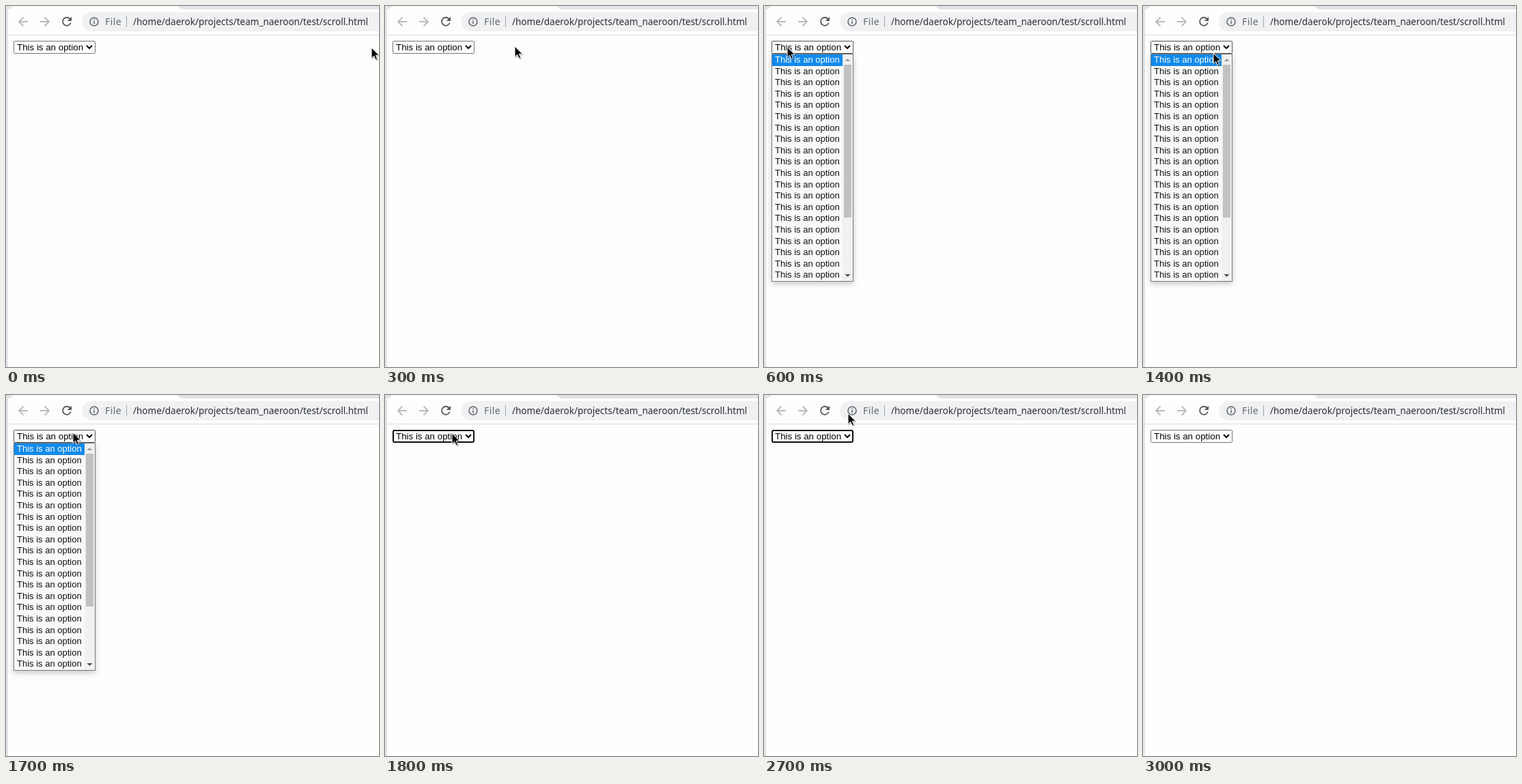
An HTML page that plays this animation: 546x529 px, repeating every 3.2 s.

```html
<!DOCTYPE html>
<html lang="en">
<head>
<meta charset="utf-8">
<title>Select menu</title>
<style>
  html, body { margin: 0; width: 100%; height: 100%; overflow: hidden; background: #fefefe; }
  svg { display: block; }
  .url { font: 13.5px "Noto Sans", "Open Sans", sans-serif; fill: #2b2e32; }
  .scheme { font-size: 14px; letter-spacing: .4px; fill: #65696d; }
  .option { font: 13px "Liberation Sans", Arial, sans-serif; fill: #111; }
  .value { font-size: 13.333px; fill: #000; }
  .line { fill: none; stroke-width: 1.8; }
  .popup { filter: drop-shadow(0 3px 4px rgba(0, 0, 0, .22)); }
</style>
</head>
<body>
<svg width="546" height="529" viewBox="0 0 546 529">
  <rect id="frame" width="546" height="529"/>
  <path d="M3 529V5Q8 5 10 0H252Q254 5 259 5H546V529Z" fill="#fefefe"/>
  <rect x="3" y="42" width="543" height="1" fill="#d9dbde"/>

  <g class="line" stroke="#b8babd">
    <path d="M32 23H19M25.5 16.5L19 23L25.5 29.5"/>
    <path d="M50 23H63M56.5 16.5L63 23L56.5 29.5"/>
  </g>
  <path class="line" d="M93.6 18.8A6 6 0 1 0 94.8 24.5" stroke="#54585c"/>
  <path d="M96 15.8V22H89.8Z" fill="#54585c"/>

  <path d="M560 9H125A14 14 0 0 0 125 37H560Z" fill="#f0f1f3"/>
  <circle cx="129" cy="23" r="6" fill="none" stroke="#5f6368" stroke-width="1.5"/>
  <path d="M129 19.2V20.8M129 22V26.6" stroke="#5f6368" stroke-width="1.5"/>
  <text class="url scheme" x="145" y="28">File</text>
  <rect x="176" y="15" width="1" height="16" fill="#a4a7aa"/>
  <text class="url" x="186" y="28">/home/daerok/projects/team_naeroon/test/scroll.html</text>

  <rect id="box" fill="#fff"/>
  <text class="option value" x="16" y="65">This is an option</text>
  <path d="M118 58L122 62L126 58" class="line" stroke="#000" style="stroke-width:2"/>

  <g id="popup">
    <rect class="popup" x="11.5" y="70.5" width="119" height="333" fill="#f9f9fa" stroke="#77797c"/>
    <rect x="12" y="71" width="103" height="17" fill="#118aee"/>
    <g id="options"></g>
    <rect x="115" y="71" width="15" height="332" fill="#f1f1f1"/>
    <rect x="117" y="86" width="11" height="224" fill="#c1c1c1"/>
    <path d="M118.5 81L122.5 77L126.5 81Z" fill="#a3a3a3"/>
    <path d="M118.5 393L122.5 397L126.5 393Z" fill="#505050"/>
  </g>

  <path id="cursor" d="M0 0V15.5L3.6 12.2L6 17.8L8.6 16.7L6.2 11.3H11Z" fill="#000"
    stroke="#fff" stroke-width="1" stroke-linejoin="round"
    style="filter:drop-shadow(1px 1px .7px rgba(0,0,0,.35))"/>
</svg>
<script>
const LOOP = 3200, OPEN = 600, CLOSE = 1800, LEAVE = 2900, BLUR = 3000;
// Pointer steps: time, x, y
const path = [
  [0, 535, 61], [100, 478, 61], [200, 345, 60], [300, 190, 59], [400, 75, 58],
  [500, 30, 59], [600, 34, 60], [1400, 103, 69], [1600, 100, 60], [1700, 98, 55],
  [1800, 98, 56], [2100, 133, 58], [2300, 180, 78], [2500, 192, 111],
  [2600, 160, 72], [2700, 123, 27], [2800, 119, 11]
];
const get = id => document.getElementById(id);
const set = (node, attrs) => {
  for (const name in attrs) node.setAttribute(name, attrs[name]);
};

for (let i = 0; i < 20; i++) {
  const option = document.createElementNS("http://www.w3.org/2000/svg", "text");
  set(option, { class: "option", x: 16, y: Math.round(83 + i * 16.6) });
  if (!i) option.style.fill = "#fff";
  option.textContent = "This is an option";
  get("options").append(option);
}

const plainBox = { x: 11.5, y: 51.5, width: 119, height: 18, rx: 1, stroke: "#747474", "stroke-width": 1 };
const focusBox = { x: 12, y: 52, width: 118, height: 17, rx: 2, stroke: "#101010", "stroke-width": 2 };

function draw(t) {
  const [, x, y] = path.findLast(step => step[0] <= t);
  set(get("cursor"), { transform: `translate(${x} ${y})`, visibility: t < LEAVE ? "visible" : "hidden" });
  set(get("popup"), { visibility: t >= OPEN && t < CLOSE ? "visible" : "hidden" });
  set(get("box"), t >= CLOSE && t < BLUR ? focusBox : plainBox);
  if (t >= 400 && t < CLOSE) set(get("box"), { stroke: "#505050" });
  set(get("frame"), { fill: t >= OPEN && t < BLUR ? "#e0e2e5" : "#e6e6ea" });
}

const start = performance.now();
function tick() {
  draw((performance.now() - start) % LOOP);
  requestAnimationFrame(tick);
}
tick();
</script>
</body>
</html>
```
